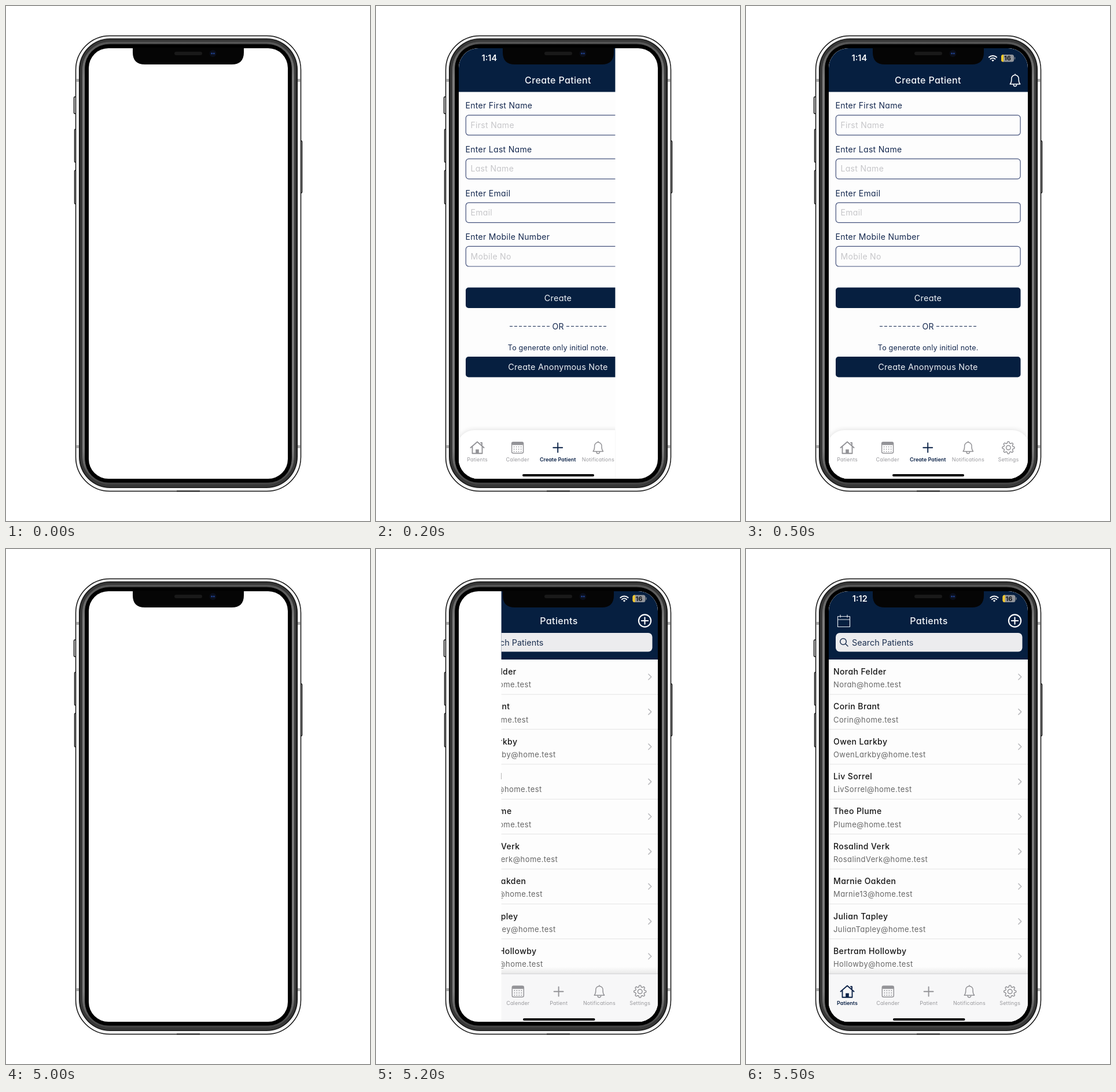
Recreate the animation shown at these times as an HTML page. Size 629x890 px, loop 8000 ms.

```html
<!DOCTYPE html>
<html lang="en">
<head>
<meta charset="utf-8">
<title>Patient app</title>
<style>
html, body { margin: 0; width: 100%; height: 100%; overflow: hidden; background: #fff; }
svg { display: block; }
text { font-family: Inter, "Open Sans", sans-serif; font-size: 14px; white-space: pre; }
.geo { font-feature-settings: "cv11"; letter-spacing: .3px; }
.title { font-size: 16px; font-weight: 500; letter-spacing: .35px; fill: #f4f6f9; }
.label { fill: #14284f; }
.hint { fill: #c6c6c9; }
.button { font-size: 14.4px; letter-spacing: .25px; fill: #eef1f5; }
.note { font-size: 12.5px; letter-spacing: .2px; fill: #14284f; }
.name { font-weight: 500; letter-spacing: .4px; fill: #151515; }
.mail { font-size: 13px; letter-spacing: .4px; fill: #666; }
.tab { font-size: 9px; letter-spacing: .15px; fill: #9a9a9e; }
.tab.on { font-weight: 600; letter-spacing: 0; fill: #0b2247; }
.time { font-size: 14.5px; font-weight: 600; fill: #fff; }
.search { font-size: 14.4px; fill: #1c3050; }
.level { font-size: 11px; font-weight: 700; fill: #15181d; }
.icon { fill: none; stroke-linecap: round; stroke-linejoin: round; }
.mid { text-anchor: middle; }
</style>
</head>
<body>
<svg width="629" height="890" viewBox="0 0 629 890">
  <defs>
    <clipPath id="glass"><rect x="143" y="73" width="344" height="744" rx="34"/></clipPath>
    <clipPath id="wipe"><rect id="edge" y="60" height="770"/></clipPath>
    <linearGradient id="rim" x2="0" y2="1">
      <stop offset="0" stop-color="#555"/><stop offset=".08" stop-color="#7c7c7c"/>
      <stop offset=".92" stop-color="#7c7c7c"/><stop offset="1" stop-color="#444"/>
    </linearGradient>
    <linearGradient id="shade" x2="0" y2="1">
      <stop offset="0" stop-color="#000" stop-opacity="0"/><stop offset="1" stop-color="#000" stop-opacity=".08"/>
    </linearGradient>
    <filter id="soft" x="-10%" y="-30%" width="120%" height="160%"><feGaussianBlur stdDeviation="5"/></filter>
  </defs>
  <g id="body"></g>
  <g clip-path="url(#glass)"><g clip-path="url(#wipe)">
    <g id="form"></g>
    <g id="list"></g>
  </g></g>
  <g id="notch"></g>
</svg>
<script>
const NAVY = '#061f40', GREY = '#949498';
const $ = id => document.getElementById(id);
const rect = (x, y, w, h, r, fill, more = '') =>
  `<rect x="${x}" y="${y}" width="${w}" height="${h}" rx="${r}" fill="${fill}" ${more}/>`;
const text = (x, y, cls, s) => `<text x="${x}" y="${y}" class="${cls}">${s}</text>`;
const icon = (x, y, d, color, width = 1.5) =>
  `<path class="icon" transform="translate(${x} ${y})" d="${d}" stroke="${color}" stroke-width="${width}"/>`;
const circle = (x, y, r, fill, more = '') => `<circle cx="${x}" cy="${y}" r="${r}" fill="${fill}" ${more}/>`;
const repeat = (n, f) => Array.from({ length: n }, (_, i) => f(i)).join('');

const gear = 'M' + Array.from({ length: 96 }, (_, i) => {
  const a = i * Math.PI / 48, r = 9.2 + 1.4 * Math.tanh(2 * Math.cos(8 * a));
  return (r * Math.cos(a)).toFixed(2) + ' ' + (r * Math.sin(a)).toFixed(2);
}).join('L') + 'ZM-3.8 0a3.8 3.8 0 1 0 7.6 0a3.8 3.8 0 1 0-7.6 0';
const dots = repeat(3, r => repeat(4, c => `M${c * 4 - 6} ${r * 4 - 1.5}h.1`));
const shapes = {
  house: 'M-11.5 0L0-10L11.5 0M-8.5-2V10H8.5V-2M6-8.5H8V-4',
  calendar: 'M-7.5-9.5h15q2.5 0 2.5 2.5v14q0 2.5-2.5 2.5h-15q-2.5 0-2.5-2.5v-14q0-2.5 2.5-2.5z',
  plus: 'M-8 0H8M0-8V8',
  bell: 'M-8.7 6.5C-5.6 3-6.2 0-6.2-3A6.2 6.2 0 0 1 6.2-3C6.2 0 5.6 3 8.7 6.5ZM-2.7 7.5a2.7 2.8 0 0 0 5.4 0M0-9.5v-1.2',
  gear
};

function drawTab(kind, x, y, color) {
  const extra = {
    house: rect(x - 2.8, y + 3, 5.6, 7, 0, color),
    calendar: rect(x - 10, y - 9.5, 20, 5, 2, color) + icon(x, y, dots, color, 1.7)
  };
  return icon(x, y, shapes[kind], color, kind === 'house' || kind === 'plus' ? 1.9 : 1.5) + (extra[kind] || '');
}

function tabBar(names, active, gap, iconY, labelY) {
  return Object.keys(shapes).map((kind, i) => {
    const x = 175 + i * gap, on = i === active;
    return drawTab(kind, x, iconY, on ? '#0b2247' : GREY) +
      text(x, labelY, 'geo mid tab' + (on ? ' on' : ''), names[i]);
  }).join('');
}

function statusBar(time, dx, dy) {
  return text(182.5 + dx / 2, 95 + dy, 'time', time) + `<g transform="translate(${dx} ${dy})">` +
    icon(426.5, 95, 'M-6.6-6.4a9.6 9.6 0 0 1 13.2 0M-4-3.4a6 6 0 0 1 8 0', '#fff', 2) +
    '<path d="M424.3 93.7q2.2-1.8 4.4 0l-2.2 2.4z" fill="#fff"/>' +
    rect(441, 84, 22, 12.4, 3.5, '#92959b') +
    '<path d="M445 84h-.5q-3.5 0-3.5 3.5v5.4q0 3.5 3.5 3.5h.5z" fill="#f6c927"/>' +
    rect(463.8, 88, 1.4, 4.4, .7, '#777c85') + text(452, 94.2, 'mid level', '16') + '</g>';
}

function phoneBody() {
  const metal = 'stroke="#111" stroke-width="1.5"';
  const buttons = [[117.5, 157, 29], [118.5, 213, 57], [118.5, 284, 58], [505.5, 233, 90]];
  return buttons.map(([x, y, h]) => rect(x, y, 6, h, 1.5, '#eee', metal)).join('') +
    rect(120.5, 51.5, 389, 787, 59, '#f5f5f5', metal) +
    [126, 759].map(y => rect(121, y, 5, 5, 0, '#aaa') + rect(504, y, 5, 5, 0, '#aaa')).join('') +
    rect(126, 56, 378, 777, 54, '#161616') +
    rect(130, 59.5, 370, 770, 50, 'none', 'stroke="#383838" stroke-width="4"') +
    rect(134, 63.5, 362, 762, 46, 'none', 'stroke="url(#rim)" stroke-width="4"') +
    rect(136.5, 66.5, 357, 757, 40, '#000') +
    rect(143, 73, 344, 744, 34, '#fff') +
    rect(295, 837.5, 40, 1.8, 0, '#111');
}

function notch() {
  return '<path d="M219 72V80Q219 101 240 101H390Q411 101 411 80V72Z" fill="#050505"/>' +
    rect(291, 79, 48, 6, 3, '#191919') + circle(357.5, 82, 6, '#0a0e1a') +
    circle(355.7, 82, 1.5, '#20408c') + circle(359.3, 82, 1.5, '#20408c');
}

function formScreen() {
  const fields = [['First Name', 'First Name'], ['Last Name', 'Last Name'],
    ['Email', 'Email'], ['Mobile Number', 'Mobile No']];
  const button = (y, s) => rect(155, y, 319.5, 35.5, 5, NAVY) + text(314.5, y + 23, 'geo mid button', s);
  const dashes = x => icon(x, 553.5, 'M0 0H69', '#14284f', 1.2)
    .replace('/>', ' stroke-dasharray="5 3" style="stroke-linecap:butt"/>');
  const bar = fill => rect(140, 733, 350, 120, 30, fill);
  return rect(140, 60, 351, 770, 0, '#fdfdfd') + rect(140, 60, 351, 88.5, 0, NAVY) +
    statusBar('1:14', 0, 0) + text(314.5, 134, 'geo mid title', 'Create Patient') +
    icon(465, 128.5, shapes.bell, '#fff', 1.5) +
    fields.map(([label, hint], i) => {
      const y = i * 75.6;
      return text(154.5, 177.3 + y, 'geo label', 'Enter ' + label) +
        rect(155.3, 188.6 + y, 318.8, 34.6, 5, '#fdfdfd', 'stroke="#44527c" stroke-width="1.2"') +
        text(163.5, 210.8 + y, 'geo hint', hint);
    }).join('') +
    button(486.5, 'Create') + dashes(231) + dashes(329) +
    text(314.7, 558.6, 'geo mid label', 'OR') +
    text(314.7, 594.5, 'geo mid note', 'To generate only initial note.') +
    button(606, 'Create Anonymous Note') +
    `<g opacity=".13" filter="url(#soft)">${bar('#000')}</g>` + bar('#fff') +
    tabBar(['Patients', 'Calender', 'Create Patient', 'Notifications', 'Settings'], 2, 69.6, 763.3, 786.8) +
    rect(253, 809, 124, 4, 2, '#000');
}

function listScreen() {
  const people = [['Norah Felder', 'Norah'], ['Corin Brant', 'Corin'], ['Owen Larkby', 'OwenLarkby'],
    ['Liv Sorrel', 'LivSorrel'], ['Theo Plume', 'Plume'], ['Rosalind Verk', 'RosalindVerk'],
    ['Marnie Oakden', 'Marnie13'], ['Julian Tapley', 'JulianTapley'], ['Bertram Hollowby', 'Hollowby']];
  return rect(140, 60, 351, 770, 0, '#fdfdfd') + rect(140, 60, 351, 131, 0, NAVY) +
    statusBar('1:12', 2.5, -4.5) + text(316, 129.6, 'geo mid title', 'Patients') +
    icon(169, 125, 'M-10.5-8.5h21v18h-21zM-10.5-3h21M-6-11v4M6-11v4', '#e4e8ee', 1.2) +
    circle(464.5, 124, 10.6, 'none', 'stroke="#fff" stroke-width="2.1"') +
    icon(464.5, 124, 'M-5.7 0H5.7M0-5.7V5.7', '#fff', 2.1) +
    rect(155, 145, 322.5, 32.5, 7, '#ececee') +
    icon(168, 160, 'M-5.3 0a5.3 5.3 0 1 0 10.6 0a5.3 5.3 0 1 0-10.6 0M4 4L8 8', '#1c3050', 1.5) +
    text(183, 166.6, 'search', 'Search Patients') +
    people.map(([name, user], i) => {
      const y = i * 60.37;
      return text(151, 217 + y, 'geo name', name) + text(151, 239.2 + y, 'geo mail', user + '@home.test') +
        icon(473.3, 221 + y, 'M-2.4-4.8L2.4 0L-2.4 4.8', '#bcbcbf', 1.6) +
        rect(140, 250.7 + y, 351, 1, 0, '#e4e4e4');
    }).join('') +
    rect(140, 722, 351, 12, 0, 'url(#shade)') + rect(140, 734, 351, 96, 0, '#f7f7f8') +
    rect(140, 733.7, 351, 1, 0, '#d6d6d8') +
    tabBar(['Patients', 'Calender', 'Patient', 'Notifications', 'Settings'], 0, 70.3, 764.7, 788.2) +
    rect(254, 811, 124.5, 4, 2, '#000');
}

$('body').innerHTML = phoneBody();
$('notch').innerHTML = notch();
$('form').innerHTML = formScreen();
$('list').innerHTML = listScreen();

const easeOut = p => 1 - (1 - Math.min(p, 1)) ** 3;

function draw() {
  // The wipes advance ten times a second.
  const t = Math.floor(performance.now() % 8000 / 100) * 100;
  const second = t >= 5000;
  const width = 350 * easeOut((second ? t - 5000 : t) / 500);
  $('form').style.display = second ? 'none' : '';
  $('list').style.display = second ? '' : 'none';
  $('edge').setAttribute('x', second ? 491 - width : 139);
  $('edge').setAttribute('width', width);
  requestAnimationFrame(draw);
}
draw();
</script>
</body>
</html>
```
